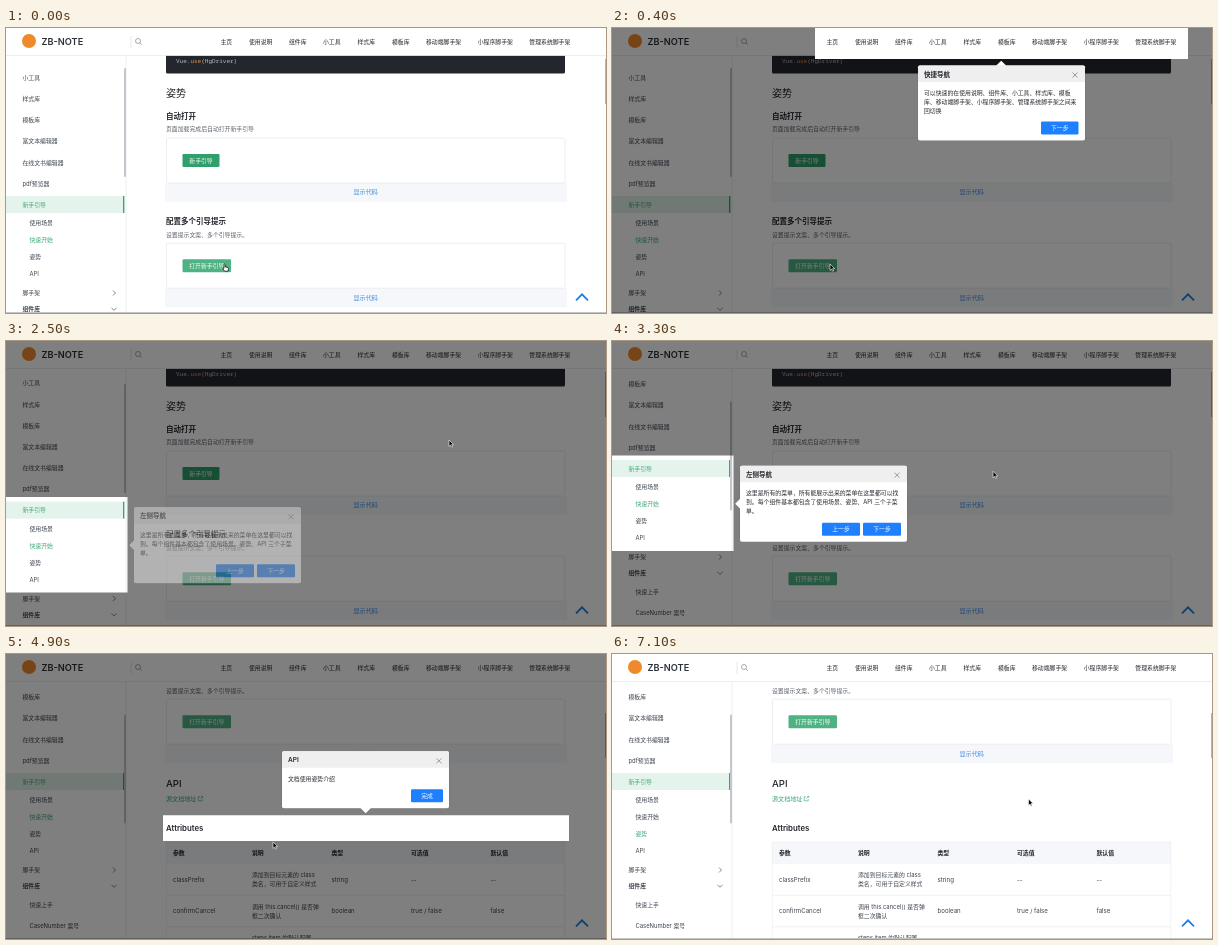
Recreate the animation shown at these times as an HTML page. Size 600 by 285 pixels, loop 7800 ms.

```html
<!DOCTYPE html>
<html lang="zh">
<head>
<meta charset="utf-8">
<style>
html, body { margin: 0; width: 100%; height: 100%; overflow: hidden; background: #fff; }
svg { display: block; width: 600px; height: 285px; font-family: Inter, "Noto Sans CJK SC", "Noto Sans CJK", sans-serif; }
.mono { font-family: "Noto Sans Mono", "DejaVu Sans Mono", monospace; }
text { white-space: pre; }
</style>
</head>
<body>
<svg id="stage" viewBox="0 0 600 285"></svg>
<script>
const LOOP = 7800, STEP = 100;
const GREEN = '#3aa675', INK = '#3c4450', DARK = '#22262c', LINE = '#e8eaec', BLUE = '#1e80ff';
const SIDE_SCROLL = 49, PAGE_SCROLL = 170;
const root = document.getElementById('stage');

function el(parent, tag, attrs = {}) {
  const node = document.createElementNS('http://www.w3.org/2000/svg', tag);
  for (const key in attrs) node.setAttribute(key, attrs[key]);
  return parent.appendChild(node);
}
const group = parent => el(parent, 'g');
const rect = (parent, x, y, width, height, fill, more) =>
  el(parent, 'rect', { x, y, width, height, fill, ...more });
const stroke = (parent, d, color, width) =>
  el(parent, 'path', { d, fill: 'none', stroke: color, 'stroke-width': width });

// y is the vertical middle of the line
function label(parent, x, y, str, { size = 5.86, fill = INK, weight = 400, anchor = 'start' } = {}) {
  const node = el(parent, 'text', {
    x, y: y + size * 0.36, fill, 'font-size': size, 'font-weight': weight, 'text-anchor': anchor
  });
  node.textContent = str;
  return node;
}

function button(parent, x, y, width, str, fill) {
  rect(parent, x, y, width, 13, fill, { rx: 1.2 });
  label(parent, x + width / 2, y + 6.5, str, { fill: '#fff', anchor: 'middle' });
}

// Main column
const page = group(root);

function demo(y, width, str, fill) {
  rect(page, 159, y + 45.5, 402, 19, '#f5f7fa');
  rect(page, 160.5, y + 0.5, 398.5, 45, '#fff', { stroke: LINE, 'stroke-width': 0.8, rx: 1.5 });
  button(page, 176.5, y + 16.5, width, str, fill);
  label(page, 359.7, y + 54.7, '显示代码', { size: 6.1, fill: '#3a8ee6', anchor: 'middle' });
}

rect(page, 160, 0, 399, 45.5, '#24262e', { rx: 1.5 });
const code = label(page, 170, 33, '', { size: 6 });
code.setAttribute('class', 'mono');
[['Vue.', '#b4b8be'], ['use', '#e0914c'], ['(HgDriver)', '#b4b8be']].forEach(([str, fill]) => {
  el(code, 'tspan', { fill }).textContent = str;
});

const heading = { size: 10, fill: DARK, weight: 500 };
const subheading = { size: 7.5, fill: DARK, weight: 600 };
const muted = { fill: '#5a616b' };
label(page, 160, 65, '姿势', heading);
label(page, 160, 88, '自动打开', subheading);
label(page, 160, 101, '页面加载完成后自动打开新手引导', muted);
demo(109.5, 37, '新手引导', '#2f9f6b');
label(page, 160, 193.3, '配置多个引导提示', subheading);
label(page, 160, 206.7, '设置提示文案、多个引导提示。', muted);
demo(214.7, 48.5, '打开新手引导', '#4fb283');

label(page, 160, 299.5, 'API', { ...heading, size: 9.6 });
label(page, 160, 314.5, '源文档地址', { size: 6.1, fill: GREEN });
stroke(page, 'M194 312.8h-1.8v4h4v-1.8M194.3 314.7l2.4-2.4m-1.6 0h1.6v1.6', GREEN, 0.6);
label(page, 160, 344.2, 'Attributes', { ...subheading, size: 7.8 });

const COLS = [167, 246, 325.5, 405, 484.5];
rect(page, 160, 358, 399, 22, '#f5f7fa');
['参数', '说明', '类型', '可选值', '默认值'].forEach((str, i) =>
  label(page, COLS[i], 369, str, { fill: DARK, weight: 600 }));
[
  ['classPrefix', ['添加到目标元素的 class', '类名，可用于自定义样式'], 'string', '--', '--'],
  ['confirmCancel', ['调用 this.cancel() 是否弹', '框二次确认'], 'boolean', 'true / false', 'false'],
  ['', ['steps item 的默认配置', ''], '', '', '']
].forEach((cells, row) => {
  const y = 395.5 + row * 31.5;
  cells.forEach((cell, i) => {
    if (Array.isArray(cell)) cell.forEach((str, n) => label(page, COLS[i], y - 4.5 + n * 9, str));
    else label(page, COLS[i], y, cell, { size: 6.1 });
  });
  stroke(page, `M160 ${y + 15.8}h399`, LINE, 0.7);
});
stroke(page, 'M160.3 358V460M558.8 358V460M160 358.2h399', LINE, 0.6);

// Sidebar
rect(root, 0, 28, 120, 257, '#fff');
stroke(root, 'M120 28V285', LINE, 0.8);
const side = group(root);
rect(side, 0, 168, 118, 17, '#e4f4ec');
rect(side, 117, 168, 1.4, 17, GREEN);
[['小工具', 49.5], ['样式库', 71], ['模板库', 92], ['富文本编辑器', 113.3], ['在线文书编辑器', 134.5],
 ['pdf预览器', 155.5], ['脚手架', 265], ['组件库', 281]].forEach(([str, y]) =>
  label(side, 16.5, y, str, { weight: str === '组件库' ? 600 : 400 }));
label(side, 16.5, 176.7, '新手引导', { fill: GREEN });
const sub = {};
[['使用场景', 195], ['快速开始', 212], ['姿势', 229], ['API', 246], ['快速上手', 300], ['CaseNumber 案号', 321]]
  .forEach(([str, y]) => { sub[str] = label(side, 23.5, y, str); });
stroke(side, 'M107 262.5l2.5 2.5l-2.5 2.5M105.5 279.8l2.5 2.5l2.5-2.5', '#555', 0.7);
const sideThumb = rect(root, 118, 40, 2, 109, '#c3c7cb', { rx: 1 });

// Header
rect(root, 0, 0, 600, 27.5, '#fff');
stroke(root, 'M0 27.5H600', LINE, 0.8);
el(root, 'circle', { cx: 23, cy: 13, r: 7, fill: '#ee8a2c' });
label(root, 35.5, 13.3, 'ZB-NOTE', { size: 9.2, fill: '#2b3138', weight: 600 });
stroke(root, 'M125 8V20', '#dcdfe3', 0.7);
el(root, 'circle', { cx: 132, cy: 13, r: 2.5, fill: 'none', stroke: '#888', 'stroke-width': 0.7 });
stroke(root, 'M133.8 14.8l2 2', '#888', 0.7);
[['主页', 214.5], ['使用说明', 243], ['组件库', 283], ['小工具', 317], ['样式库', 351.5], ['模板库', 386],
 ['移动端脚手架', 420], ['小程序脚手架', 471.7], ['管理系统脚手架', 523.3]].forEach(([str, x]) =>
  label(root, x, 13.8, str, { fill: DARK }));

const pageThumb = rect(root, 599, 31, 1, 45, '#b4b4b4');
stroke(root, 'M570 272.3l6-6l6 6', '#1a7fe0', 1.7);
rect(root, 0, 284, 600, 1, '#c4c4c4');

// Guide layer
const navStrip = rect(root, 203, 27, 373, 4, '#fff');
const dim = el(root, 'path', { 'fill-rule': 'evenodd' });

function popover(title, lines, height, arrow, buttons) {
  const g = group(root);
  rect(g, -0.4, -0.4, 167.8, height + 0.8, '#000', { opacity: 0.12, rx: 2 });
  rect(g, 0, 0, 167, height, '#fff', { rx: 1.8 });
  el(g, 'path', { d: 'M0 16.5V1.8Q0 0 1.8 0H165.2Q167 0 167 1.8V16.5Z', fill: '#efefef' });
  el(g, 'polygon', { points: arrow, fill: '#fff' });
  label(g, 6, 8.7, title, { size: 6.5, fill: DARK, weight: 600 });
  stroke(g, 'M154.5 7l5 5m0-5l-5 5', '#777', 0.7);
  lines.forEach((str, i) => label(g, 6, 27.2 + i * 9.2, str, { fill: DARK }));
  buttons.forEach(([x, width, str]) => button(g, x, height - 19, width, str, BLUE));
  return g;
}

const popNav = popover('快捷导航',
  ['可以快速的在使用说明、组件库、小工具、样式库、模板', '库、移动端脚手架、小程序脚手架、管理系统脚手架之间来', '回切换'],
  75, '78,0.2 83.2,-4.8 88.4,0.2', [[123, 37.5, '下一步']]);
const popSide = popover('左侧导航',
  ['这里是所有的菜单，所有能展示出来的菜单在这里都可以找', '到。每个组件基本都包含了使用场景、姿势、API 三个子菜', '单。'],
  76, '0.2,33 -4.8,38 0.2,43', [[82, 38, '上一步'], [123, 38, '下一步']]);
const popApi = popover('API', ['文档使用姿势介绍'], 57, '78.5,56.8 83.7,62 88.9,56.8', [[129, 32, '完成']]);

// Pointer shapes, tip at the origin
const arrowCursor = el(root, 'path', {
  d: 'M0 0V6.4L1.5 5L2.5 7.2L3.5 6.8L2.6 4.6H4.6Z', fill: '#000', stroke: '#fff', 'stroke-width': 0.6
});
const handCursor = el(root, 'path', {
  d: 'M0 .6Q.6-.5 1.2 .6V2.9L4 3.5Q4.6 3.8 4.5 4.6L4 7.2H.6L-1.3 4.6Q-1.2 3.6 0 4.3Z',
  fill: '#fff', stroke: '#000', 'stroke-width': 0.7
});

const POINTER = [[0, 218, 236], [1000, 218, 236], [2300, 443, 99], [2900, 443, 99], [3900, 267, 188],
                 [5100, 267, 188], [5800, 312, 172], [6400, 416.5, 145], [LOOP, 416.5, 145]];
const HAND = [[0, 100], [2100, 2500], [3700, 4300], [6200, 6600]];

const ramp = (t, a, b) => Math.min(1, Math.max(0, (t - a) / (b - a)));
const smooth = p => p * p * (3 - 2 * p);
const within = (t, a, b) => t >= a && t < b;

function pointerAt(t) {
  const i = POINTER.findIndex((k, n) => n > 0 && t <= k[0]);
  const [a, x0, y0] = POINTER[i - 1], [b, x1, y1] = POINTER[i];
  const p = smooth(ramp(t, a, b));
  return [x0 + (x1 - x0) * p, y0 + (y1 - y0) * p];
}

function place(node, x, y, opacity = 1) {
  node.setAttribute('transform', `translate(${x} ${y})`);
  node.setAttribute('opacity', opacity);
}

function draw(t) {
  const sideY = SIDE_SCROLL * smooth(ramp(t, 2400, 2808));
  const pageY = PAGE_SCROLL * smooth(ramp(t, 4300, 4800));
  place(side, 0, -sideY);
  place(page, 0, -pageY);
  sideThumb.setAttribute('y', 40 + sideY * 0.42);
  pageThumb.setAttribute('y', 31 + pageY * 0.165);
  sub['快速开始'].setAttribute('fill', t < 5100 ? GREEN : INK);
  sub['姿势'].setAttribute('fill', t < 5100 ? INK : GREEN);

  const inNav = within(t, 100, 2500), inSide = within(t, 2500, 4300), inApi = within(t, 4300, 6600);
  const hole = inNav ? [203, 0, 373, 31] : inSide ? [0, 163.5 - sideY, 121.5, 95.5] : [157, 331.3 - pageY, 406, 25.7];
  const [x, y, w, h] = hole;
  dim.setAttribute('d', `M0 0H600V285H0ZM${x} ${y}h${w}v${h}h${-w}Z`);
  const shade = inApi ? 0.6 - 0.1 * ramp(t, 4400, 4700) : 0.5 * ramp(t, 0, 300);
  dim.setAttribute('opacity', within(t, 100, 6600) ? shade : 0);
  navStrip.setAttribute('opacity', inNav ? 1 : 0);

  place(popNav, 306, 37.5, inNav ? ramp(t, 0, 300) : 0);
  place(popSide, 128, 173.7 - sideY, inSide ? 0.4 + 0.6 * ramp(t, 2500, 2700) : 0);
  place(popApi, 276, 267.3 - pageY, inApi ? ramp(t, 4300, 4600) : 0);

  const [px, py] = pointerAt(t);
  const hand = HAND.some(([a, b]) => within(t, a, b));
  place(arrowCursor, px, py, hand ? 0 : 1);
  place(handCursor, px, py, hand ? 1 : 0);
}

const start = performance.now();
function tick() {
  const t = (performance.now() - start) % LOOP;
  draw(Math.floor(t / STEP) * STEP);
  requestAnimationFrame(tick);
}
tick();
</script>
</body>
</html>
```
